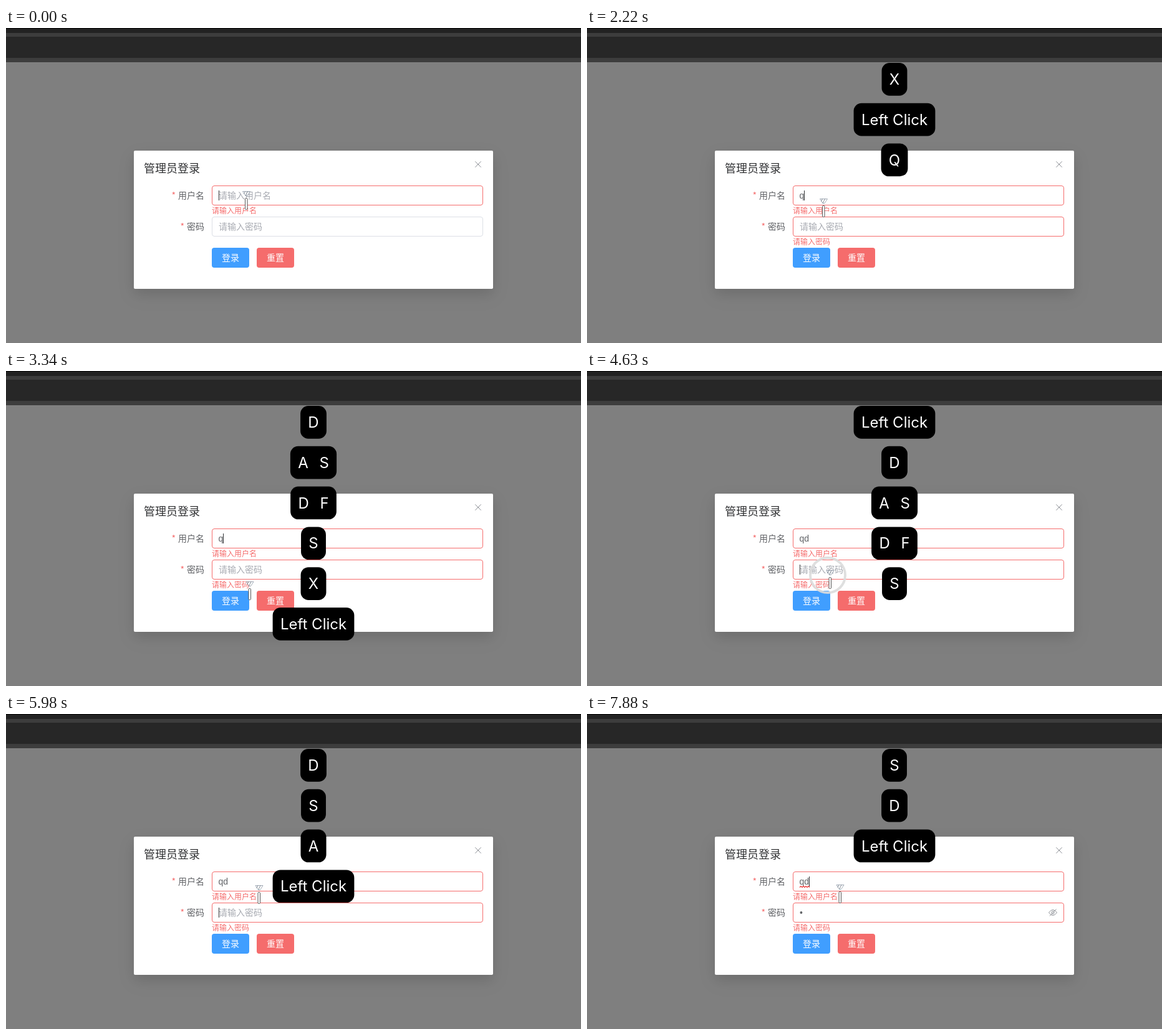
An HTML page that plays this animation: 922 by 506 pixels, repeating every 8000 ms.

```html
<!DOCTYPE html>
<html lang="zh">
<head>
<meta charset="utf-8">
<title>登录</title>
<style>
  html, body { margin: 0; width: 100%; height: 100%; overflow: hidden; background: #7f7f7f; }
  svg { display: block; width: 100vw; height: 100vh; }
  text { font-family: "Noto Sans CJK SC", "Noto Sans CJK", sans-serif; font-size: 14px; fill: #606266; }
  .title { font-size: 18px; fill: #303133; }
  .hint { fill: #a8abb2; }
  .error { font-size: 12px; fill: #f56c6c; }
  .star { fill: #f56c6c; }
  .button { fill: #fff; font-weight: 500; text-anchor: middle; }
  .value { font-family: "Liberation Sans", Arial, sans-serif; }
  .key text { font-family: Inter, sans-serif; font-size: 24px; fill: #fff; text-anchor: middle; }
  .pair text { word-spacing: 11px; }
  .field { fill: #fff; stroke: #f56c6c; }
  .dialog { filter: drop-shadow(0 8px 10px rgba(0,0,0,.09)) drop-shadow(0 10px 14px rgba(0,0,0,.06)); }
  .line { fill: none; stroke: #909399; }
</style>
</head>
<body>
<svg viewBox="0 0 922 506" preserveAspectRatio="none">
  <rect width="922" height="506" fill="#7f7f7f"/>
  <rect width="922" height="55" fill="#3d3d3d"/>
  <rect width="922" height="8" fill="#222"/>
  <rect width="922" height="1" fill="#050505"/>
  <rect y="14" width="922" height="34" fill="#272727"/>

  <rect class="dialog" x="205" y="197" width="576" height="222" rx="2" fill="#fff"/>
  <text class="title" x="221" y="232">管理员登录</text>
  <path class="line" d="M752.3 214.3l9.4 9.4m0-9.4l-9.4 9.4"/>

  <text class="star" x="265.5" y="274">*</text>
  <text x="276" y="274">用户名</text>
  <rect class="field" x="330.5" y="253.5" width="434" height="31" rx="3.5"/>
  <text id="userHint" class="hint" x="341" y="274">请输入用户名</text>
  <text id="user" class="value" x="340.5" y="274"></text>
  <path id="squiggle" d="M341 278.5l2-2 2 2 2-2 2 2 2-2 2 2 2-2 2 2" fill="none" stroke="#e33" stroke-width="1.2"/>
  <text class="error" x="330" y="298">请输入用户名</text>

  <text class="star" x="279.5" y="324">*</text>
  <text x="290" y="324">密码</text>
  <rect id="passField" class="field" x="330.5" y="303.5" width="434" height="31" rx="3.5"/>
  <text id="passHint" class="hint" x="341" y="324">请输入密码</text>
  <g id="passValue">
    <text class="value" x="341" y="324">•</text>
    <path class="line" stroke="#a8abb2" d="M740.5 319q6.500-9 13 0q-6.500 9-13 0zM742 324.500l10.500-11"/>
    <circle class="line" cx="747" cy="319" r="2.200"/>
  </g>
  <g id="passError"><text class="error" x="330" y="348">请输入密码</text></g>

  <rect x="330" y="353" width="60" height="32" rx="4" fill="#409eff"/>
  <text class="button" x="360" y="374">登录</text>
  <rect x="402" y="353" width="60" height="32" rx="4" fill="#f56c6c"/>
  <text class="button" x="432" y="374">重置</text>
  <rect id="caret" width="1" height="16" fill="#303133"/>

  <g id="keys"></g>
  <circle id="ring" r="28" fill="none" stroke="#dcdcdc" stroke-width="4"/>
  <g id="cursor">
    <path d="M-5.500-10.500H6.500L2-3.500H-1z" fill="#fff" fill-opacity=".6" stroke="#8d99a6" stroke-width=".8"/>
    <path d="M-1.500-10.500l-2 4M2.500-10.500l-3.500 7" stroke="#66727e" stroke-width=".8"/>
    <rect x="-1.500" y=".5" width="3.500" height="18" rx="1.200" fill="#fff" stroke="#555" stroke-width="1"/>
  </g>
</svg>
<script>
const LOOP = 8000;
const $ = id => document.getElementById(id);
const clamp = v => Math.max(0, Math.min(1, v));
const within = (t, spans) => spans.some(([from, to]) => t >= from && t < to);
const show = (id, on) => $(id).setAttribute('visibility', on ? 'visible' : 'hidden');

// label, time it appears, time it goes
const presses = [
  ['Q', 200, 2520], ['Left Click', 800, 3900], ['X', 2140, 4220],
  ['S', 2540, 4720], ['D F', 2740, 4900], ['A S', 2960, 5080], ['D', 3200, 5220],
  ['Left Click', 4450, 6620], ['A', 4860, 7060], ['S', 5080, 7150], ['D', 5280, 7430],
  ['Left Click', 6300, 9000], ['D', 7040, 9000], ['S', 7830, 9000]
];

// time, x, y
const route = [
  [90, 385, 273], [700, 371.5, 315], [880, 371.5, 315], [1250, 371, 306], [1320, 371, 306],
  [1650, 379, 285], [2500, 379, 285], [3250, 390.5, 349], [3610, 390.5, 349],
  [4250, 389.5, 331], [4700, 389.5, 331], [5320, 405.5, 286], [6250, 405.5, 286], [6600, 405.5, 285]
];

const clicks = [780, 1710, 4450, 6290];
const userCaret = [[0, 780], [1710, 4140], [6280, 6810], [7040, LOOP]];
const passCaret = [[780, 1310], [4450, 4980], [5510, 6280]];

function makeKey([label, from, to]) {
  const group = document.createElementNS('http://www.w3.org/2000/svg', 'g');
  group.setAttribute('class', /^. .$/.test(label) ? 'key pair' : 'key');
  group.innerHTML = `<rect height="52.7" rx="12.5"/><text y="35">${label}</text>`;
  $('keys').append(group);
  const width = group.lastChild.getComputedTextLength() + 24.5;
  group.firstChild.setAttribute('x', -width / 2);
  group.firstChild.setAttribute('width', width);
  return { group, from, to };
}
const keys = presses.map(makeKey);

function cursorAt(t) {
  const next = route.findIndex(p => p[0] > t);
  if (next < 0) return route[route.length - 1].slice(1);
  if (next === 0) return route[0].slice(1);
  const [t0, x0, y0] = route[next - 1], [t1, x1, y1] = route[next];
  const k = (t - t0) / (t1 - t0), e = k * k * (3 - 2 * k);
  return [x0 + (x1 - x0) * e, y0 + (y1 - y0) * e];
}

function drawKeys(t) {
  let slot = 0;
  for (let i = keys.length - 1; i >= 0; i--) {
    const { group, from, to } = keys[i];
    const on = t >= from && t < to;
    group.setAttribute('visibility', on ? 'visible' : 'hidden');
    if (!on) continue;
    group.setAttribute('transform', `translate(493 ${56 + slot++ * 64.8})`);
    group.setAttribute('opacity', clamp(Math.min((t - from + 25) / 50, (to - t) / 50)));
  }
}

function drawForm(t) {
  const name = t < 350 ? '' : t < 3610 ? 'q' : 'qd';
  $('user').textContent = name;
  show('userHint', !name);
  show('squiggle', within(t, [[6300, 7050], [7850, LOOP]]));

  show('passHint', t < 6250);
  show('passValue', t >= 6250);
  $('passField').style.stroke = t < 780 ? '#dcdfe6' : t < 1710 ? '#409eff' : '#f56c6c';
  const grow = clamp((t - 1710) / 300);
  $('passError').setAttribute('opacity', grow);
  $('passError').setAttribute('transform', `translate(0 ${336 * (1 - grow)}) scale(1 ${grow})`);

  const inUser = within(t, userCaret), inPass = within(t, passCaret);
  show('caret', inUser || inPass);
  $('caret').setAttribute('x', inUser ? [341, 348, 356][name.length] : 341);
  $('caret').setAttribute('y', inUser ? 261 : 311);
}

function drawPointer(t) {
  const [x, y] = cursorAt(t);
  $('cursor').setAttribute('transform', `translate(${x} ${y})`);
  const age = t - clicks.filter(c => c <= t).pop();
  show('ring', age < 260);
  $('ring').setAttribute('opacity', clamp((260 - age) / 50) * 0.9);
  $('ring').setAttribute('cx', x - 3.5);
  $('ring').setAttribute('cy', y - 3);
}

function frame() {
  const t = performance.now() % LOOP;
  drawForm(t);
  drawKeys(t);
  drawPointer(t);
  requestAnimationFrame(frame);
}
frame();
</script>
</body>
</html>
```
